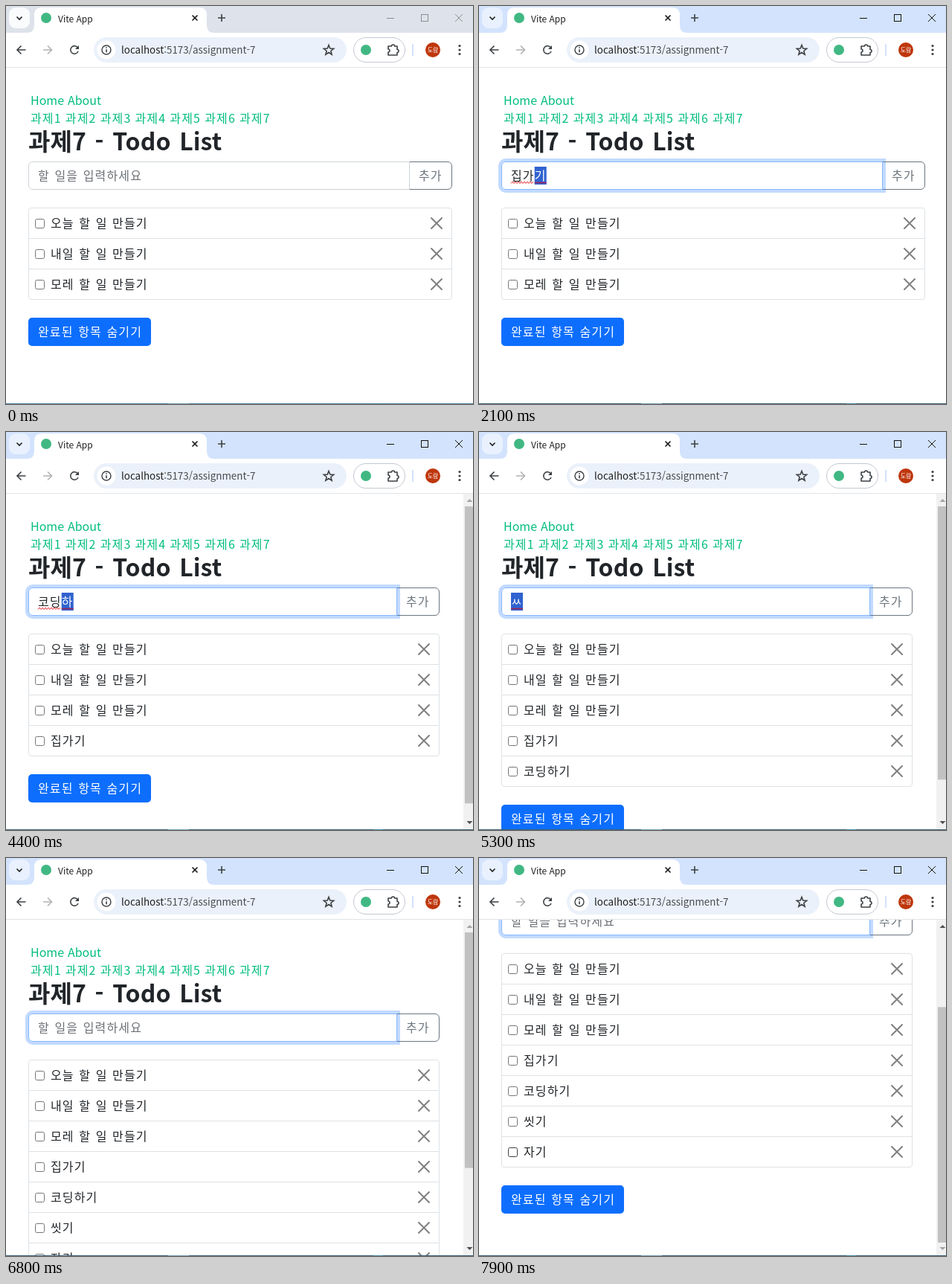
Write an HTML page that moves like this. It is 628 by 535 pixels and loops after 8000 ms.

```html
<!DOCTYPE html>
<html lang="ko">
<head>
<meta charset="utf-8">
<title>Todo List</title>
<style>
  html, body { margin: 0; width: 100%; height: 100%; overflow: hidden; background: #fff; }
  svg { display: block; width: 628px; height: 535px; }
  text { font-family: "Noto Sans CJK KR", "Noto Sans CJK", "Noto Sans CJK JP", sans-serif; white-space: pre; }
  .ko { font-size: 16px; letter-spacing: 1.15px; word-spacing: .9px; fill: #212529; }
  .link { fill: #00bd7e; }
  .en { font-size: 16px; fill: #00bd7e; }
  .line { fill: none; stroke-width: 1.6; stroke: #3c4043; }
</style>
</head>
<body>
<svg viewBox="0 0 628 535">
  <defs>
    <clipPath id="view"><rect y="83" width="628" height="451"/></clipPath>
  </defs>
  <rect width="628" height="535" fill="#fff"/>

  <g id="page" clip-path="url(#view)">
    <g id="content">
      <g id="nav">
        <text class="en" x="33" y="133">Home</text>
        <text class="en" x="83" y="133">About</text>
      </g>
      <text x="30" y="194" font-size="32" font-weight="700" fill="#212529" letter-spacing=".1" word-spacing="2.5">과제7 - Todo List</text>

      <g id="add">
        <path d="M542.5 209.5H594a5.500 5.500 0 0 1 5.500 5.500V241a5.500 5.500 0 0 1-5.500 5.500H542.500Z" fill="#fff" stroke="#6c757d"/>
        <text class="ko" x="555" y="234" style="fill:#6c757d">추가</text>
      </g>
      <path id="glow" fill="none" stroke="#0d6efd" stroke-width="4"/>
      <path id="field" fill="#fff"/>
      <text id="hint" class="ko" x="43" y="234" style="fill:#6c7075">할 일을 입력하세요</text>
      <rect id="caret" x="43" y="217" width="1" height="21" fill="#000"/>
      <g id="typing">
        <rect id="mark" y="216" width="16" height="24" fill="#3062d0"/>
        <text class="ko" x="43" y="234"><tspan id="done"></tspan><tspan id="open" fill="#fff"></tspan></text>
        <path id="under" fill="none" stroke-width="1.500"/>
        <path id="wave" fill="none" stroke="#e8292f"/>
      </g>

      <rect id="frame" x="30.5" y="271.5" rx="3.500" fill="#fff" stroke="#dee2e6"/>
      <g id="list"></g>
      <g id="hide">
        <rect x="30" y="24" width="165" height="38" rx="5" fill="#0d6efd"/>
        <text class="ko" x="43" y="49" style="fill:#fff">완료된 항목 숨기기</text>
      </g>
    </g>
    <g id="bar">
      <rect x="615" y="83" width="13" height="451" fill="#f1f1f1"/>
      <rect id="thumb" x="617" width="11" fill="#c1c1c1"/>
      <path id="up" d="M619.500 94h8l-4-4z"/>
      <path id="down" d="M619.500 523h8l-4 4z"/>
    </g>
  </g>

  <rect id="strip" width="628" height="36"/>
  <rect id="search" x="4" y="2" width="28" height="28" rx="9"/>
  <path class="line" d="M14.500 14.500l3.500 3.500l3.500-3.500" style="stroke:#1f1f1f"/>
  <path d="M28 36q10 0 10-10V12q0-10 10-10H260q10 0 10 10V26q0 10 10 10Z" fill="#fff"/>
  <circle cx="54" cy="16" r="7" fill="#41b883"/>
  <text x="70" y="22" font-size="12" fill="#1f1f1f">Vite App</text>
  <path class="line" d="M250.500 12.500l7 7m0-7l-7 7" style="stroke:#1f1f1f"/>
  <path class="line" d="M285 16h10M290 11v10"/>
  <g id="controls" fill="none">
    <path d="M512 16.500h10"/>
    <rect x="558.500" y="11.500" width="9" height="9"/>
    <path d="M604 11l10 10m0-10l-10 10"/>
  </g>

  <rect y="36" width="628" height="46" fill="#fff"/>
  <rect y="82" width="628" height="1" fill="#e1e4e8"/>
  <path class="line" d="M26.500 59H15M20.500 53.500L15 59l5.500 5.500"/>
  <path class="line" d="M50 59h11.500M56 53.500L61.500 59L56 64.500" style="stroke:#b0b2b5"/>
  <path class="line" d="M96.500 56A5.300 5.300 0 1 0 97 61"/>
  <path d="M98 53v5h-5z" fill="#3c4043"/>
  <rect x="118" y="42" width="340" height="34" rx="17" fill="#ebf1fa"/>
  <circle cx="135" cy="59" r="12.500" fill="#fff"/>
  <circle class="line" cx="135" cy="59" r="6" style="stroke-width:1.400"/>
  <path class="line" d="M135 58.200v4M135 55.200v1.600"/>
  <text x="155" y="64" font-size="13.400" fill="#1f1f1f">localhost<tspan fill="#474b50">:5173/assignment-7</tspan></text>
  <path id="star" class="line"/>
  <rect x="467.500" y="42.500" width="69" height="33" rx="16.500" fill="#fff" stroke="#c3c8d1"/>
  <circle cx="484" cy="59" r="7" fill="#41b883"/>
  <path class="line" d="M514 54h4.500a2 2 0 0 1 4 0H526v4.500a2 2 0 0 1 0 4V66H514v-4a2 2 0 0 0 0-4Z" stroke-linejoin="round"/>
  <rect x="546" y="51" width="2" height="16" fill="#d3e3fd"/>
  <circle cx="574" cy="59" r="10" fill="#bf360c"/>
  <text x="574" y="62" font-size="8" text-anchor="middle" fill="#fff">도람</text>
  <g fill="#3c4043">
    <circle cx="610" cy="53.500" r="1.600"/><circle cx="610" cy="59" r="1.600"/><circle cx="610" cy="64.500" r="1.600"/>
  </g>

  <rect id="edge" y="534" width="628" height="1"/>
  <rect x="218" y="534" width="28" height="1" fill="#7aa3b5"/>
  <rect x="494" y="534" width="13" height="1" fill="#4b8ca6"/>
</svg>
<script>
const LOOP = 8000;
const ROW = 41;
const VIEW = 451;
const TRACK = 417;
const $ = id => document.getElementById(id);
const set = (id, attrs) => {
  for (const k in attrs) $(id).setAttribute(k, attrs[k]);
};
const show = (el, on) => { el.style.display = on ? "" : "none"; };

const todos = ["오늘 할 일 만들기", "내일 할 일 만들기", "모레 할 일 만들기", "집가기", "코딩하기", "씻기", "자기"];
// words the spell checker accepts
const known = ["집", "코", "콩", "자", "자기"];

const typed = [
  [0, ""],
  [1700, "ㅈ"], [1800, "집"], [1900, "집ㄱ"], [2000, "집각"], [2100, "집가기"], [2400, ""],
  [2900, "ㅋ"], [3000, "코"], [3300, "콩"], [3600, "코"], [3700, "ㅋ"], [3800, "코"],
  [4100, "코디"], [4200, "코딩"], [4300, "코딩ㅎ"], [4400, "코딩하"], [4500, "코딩학"], [4600, "코딩하기"], [4800, ""],
  [5300, "ㅆ"], [5400, "씨"], [5500, "씻"], [5600, "씻ㄱ"], [5700, "씻기"], [5900, ""],
  [6000, "자"], [6100, "자기"], [6300, ""]
];
const counts = [[0, 3], [2400, 4], [4800, 5], [5900, 6], [6300, 7]];
const focus = [[0, 0], [900, .5], [1000, 1]];
const scrolls = [[0, 0], [7000, 50], [7100, 114], [7200, 136], [7300, 143]];
const carets = [[0, 0], [900, 1], [1400, 0], [2400, 1], [2800, 0], [4800, 1], [5300, 0],
  [5900, 1], [6000, 0], [6300, 1], [6800, 0], [7300, 1], [7800, 0]];

const at = (steps, t) => {
  let value = steps[0][1];
  for (const [start, v] of steps) if (t >= start) value = v;
  return value;
};

$("nav").innerHTML += Array.from({ length: 7 }, (_, i) =>
  `<text class="ko link" x="${33 + 46.83 * i}" y="157">과제${i + 1}</text>`).join("");

$("list").innerHTML = todos.map((name, i) => `<g transform="translate(0 ${271 + ROW * i})">
  ${i ? '<rect class="rule" x="31" height="1" fill="#dee2e6"/>' : ""}
  <rect class="box" x="39.5" y="15.5" width="12" height="12" rx="2" fill="#fff" stroke="#767676"/>
  <text class="ko" x="60" y="27">${name}</text>
  <path class="close" d="M572 14l14 14m0-14l-14 14" stroke="#808080" stroke-width="2" stroke-linecap="round"/>
</g>`).join("");
const rows = [...$("list").children];

$("star").setAttribute("d", "M" + Array.from({ length: 10 }, (_, i) => {
  const r = i % 2 ? 3 : 7, a = (i / 5 - .5) * Math.PI;
  return `${(434 + r * Math.cos(a)).toFixed(2)} ${(59.5 + r * Math.sin(a)).toFixed(2)}`;
}).join("L") + "Z");

function zigzag(x0, x1) {
  let d = `M${x0} 238.500`;
  for (let x = x0 + 2, up = true; x <= x1; x += 2, up = !up) d += `L${x} ${up ? 236 : 238.5}`;
  return d;
}

function leftRounded(x0, y0, x1, y1, r) {
  return `M${x1} ${y0}H${x0 + r}a${r} ${r} 0 0 0 ${-r} ${r}V${y1 - r}a${r} ${r} 0 0 0 ${r} ${r}H${x1}Z`;
}

function drawInput(t, shift) {
  const f = at(focus, t), text = at(typed, t);
  const mix = (a, b) => Math.round(a + (b - a) * f);
  set("add", { transform: `translate(${-shift} 0)` });
  set("field", {
    d: leftRounded(30.5, 209.5, 542.5 - shift, 246.5, 5.5),
    stroke: `rgb(${mix(206, 134)},${mix(212, 183)},${mix(218, 254)})`
  });
  set("glow", { d: leftRounded(28, 207, 545 - shift, 249, 8), "stroke-opacity": .25 * f });
  show($("hint"), !text);
  show($("caret"), at(carets, t));
  show($("typing"), text);
  if (!text) return;

  const n = text.length - 1, x = 43 + 15.87 * n, wrong = !known.includes(text);
  $("done").textContent = text.slice(0, n);
  $("open").textContent = text.slice(n);
  set("mark", { x });
  set("under", { d: `M${x} 237.5h16`, stroke: wrong ? "#a51f4d" : "#10204a" });
  set("wave", { d: wrong && n ? zigzag(43, x) : "" });
}

function drawPage(t) {
  const n = at(counts, t), y = at(scrolls, t), shift = n > 3 ? 17 : 0, right = 600 - shift;
  const end = 272 + ROW * n;
  set("content", { transform: `translate(0 ${-y})` });
  drawInput(t, shift);

  set("frame", { width: right - 31, height: ROW * n });
  rows.forEach((row, i) => {
    show(row, i < n);
    row.querySelector(".rule")?.setAttribute("width", right - 32);
    row.querySelector(".close").setAttribute("transform", `translate(${-shift} 0)`);
  });
  rows[6].querySelector(".box").setAttribute("stroke", t >= 7900 ? "#3f3f3f" : "#767676");
  set("hide", { transform: `translate(0 ${end})` });

  show($("bar"), shift);
  const height = 594 - ROW * (7 - n), ratio = TRACK / height;
  set("thumb", { y: 100 + y * ratio, height: VIEW * ratio });
  set("up", { fill: y > 0 ? "#505050" : "#a3a3a3" });
  set("down", { fill: y < height - VIEW ? "#505050" : "#a3a3a3" });
}

function drawWindow(active) {
  set("strip", { fill: active ? "#d3e3fd" : "#dee2ea" });
  set("search", { fill: active ? "#e9f1fe" : "#fafbfc" });
  set("controls", { stroke: active ? "#111" : "#8c8f94" });
  set("edge", { fill: active ? "#3f6376" : "#5384a0" });
}

function draw(t) {
  drawWindow(t >= 900);
  drawPage(t);
}

const start = performance.now();
function tick() {
  draw((performance.now() - start) % LOOP);
  requestAnimationFrame(tick);
}
draw(0);
requestAnimationFrame(tick);
</script>
</body>
</html>
```
